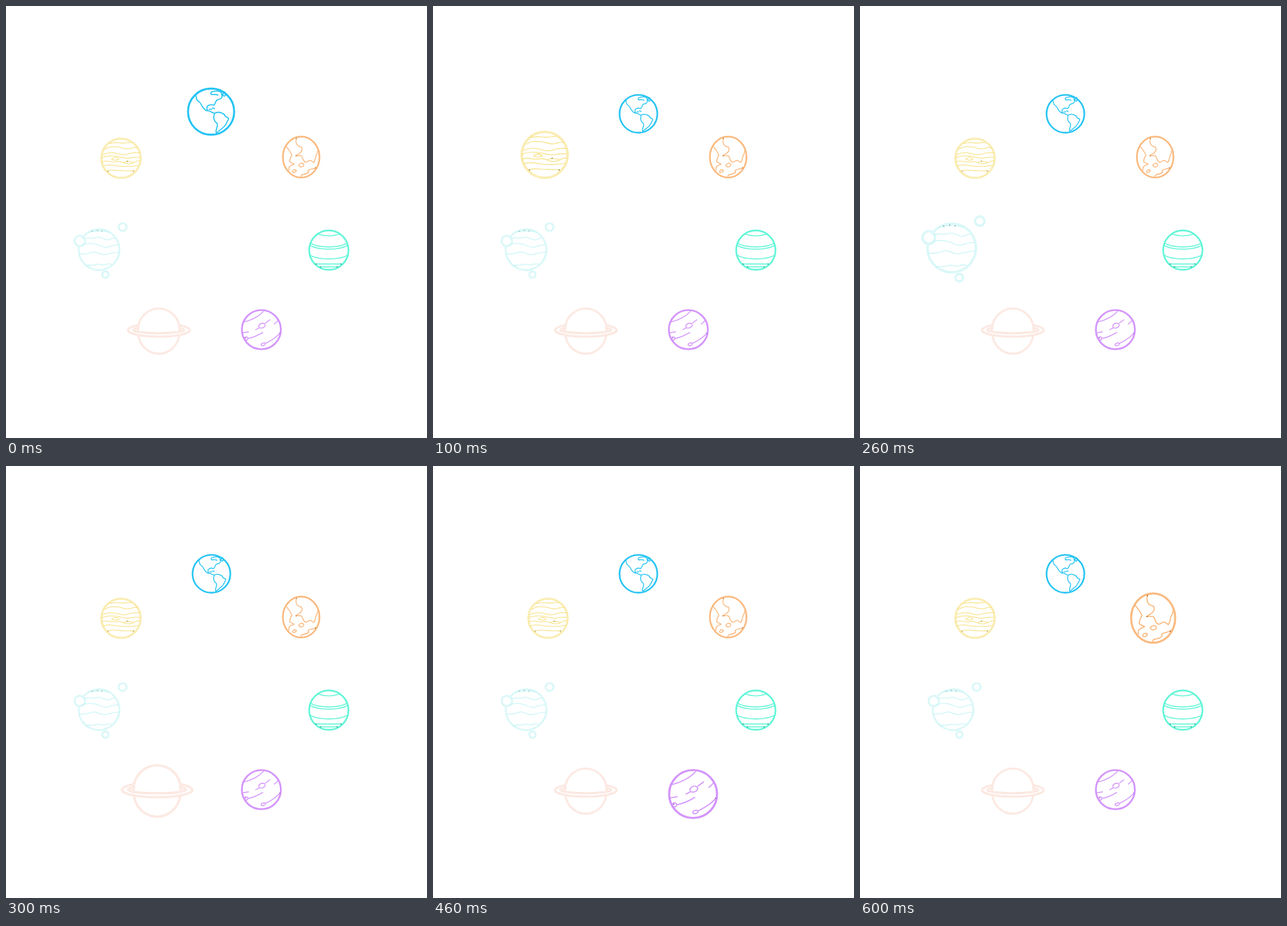
An HTML page for the animation above (0.7 s loop, 624 by 640 pixels).

```html
<!DOCTYPE html>
<html lang="en">
<head>
<meta charset="utf-8">
<title>Planets</title>
<style>
html, body { margin: 0; width: 100%; height: 100%; overflow: hidden; background: #fff; }
svg { display: block; }
</style>
</head>
<body>
<svg id="stage" width="624" height="640" viewBox="0 0 624 640" fill="none" stroke-linecap="round" stroke-linejoin="round"></svg>
<script>
const STEP = 100;

const oval = (x, y, rx, ry = rx) =>
  `M${x - rx} ${y}a${rx} ${ry} 0 1 1 ${2 * rx} 0a${rx} ${ry} 0 1 1 ${-2 * rx} 0z`;

// Each planet is drawn at its enlarged size; "rest" is the resting centre and scale.
const planets = [
  { // blue
    color: '#22c3f3', at: [304, 156.5], rest: [304.5, 159.7, .82], rimWidth: 2.9, lineWidth: 1.6,
    rim: oval(304, 156.5, 34.2),
    lines: `M281 132C283 135 281 139 285 141C289 143 289 146 291 149C293 152 295 154 297 155Q302 155 304 157L309 159
      M299 155C297 152 297 148 301 147C304 145 306 147 308 147C311 145 310 141 313 139C318 138 321 137 320 132
      C320 128 318 126 313 126C307 126 302 127 304 131C307 132 311 130 314 132
      M309 159C314 156 320 158 324 161C324 165 329 164 330 167C328 171 327 175 323 179Q317 184 312 188
      C309 185 315 179 313 174C307 170 307 165 309 159M306 151l3 1M301 153l4 0` + oval(323.5, 130.5, 2, 3)
  },
  { // yellow
    color: '#f7e080', at: [165.5, 220.5], rest: [170.5, 225.5, .855], pale: true,
    rim: oval(165.5, 220.5, 34),
    lines: `M146 195q8-2 16-1t21-1M138 205c8-6 14-4 22-4s12 5 20 3 8-3 14-2
      M134 214c9-4 16-4 23-2s14 4 22 1 12-2 19-2M132 220c8-4 16-4 24-3s18 5 26 3 10-1 16-1
      M149 222q7-6 13 0q-6 4-13 0zM169 228q9-4 19 0q-9 5-19 0z
      M132 227c9-4 13 0 20 0s10-2 17 1M188 228q6-4 11-3
      M134 234c9-4 18-1 26 0s20 2 35-1M142 243c8-4 16-1 23-1s16 1 23 0`,
    dots: [[176.5, 225.5], [143, 243], [187, 243]], dotColor: '#96803b'
  },
  { // pale cyan
    color: '#c4f3f4', at: [136, 358.5], rest: [138, 361, .84], pale: true,
    rim: `M107 337A36 36 0 1 1 100.5 352` + oval(102, 343, 9.3) + oval(177.5, 318.7, 7) + oval(147.2, 402.5, 5.6),
    lines: `M117 328q19-5 37 0M110 339c8-3 14 1 22-2s14 6 21 4 6-3 10-3
      M106 350c10-4 18-3 25-1s13 7 20 5 12-4 19-4M101 366c10 1 16 0 23-3s14 6 23 4 16-4 24-4
      M113 388c6-5 10 0 17-3s10 2 16 0 8-2 12-1`,
    dots: [[124, 326], [133, 324.5], [141, 325.5]], dotColor: '#78a6a8'
  },
  { // ringed pink
    color: '#fadbd0', at: [224, 479], rest: [226.5, 479.5, .88], pale: true,
    rim: `M189 483V479A35 35.5 0 0 1 259 479V483M190 490A34.5 35.5 0 0 0 258 490
      M190 471.5A52 11 0 1 0 258 471.5M190 476A43 5.5 0 1 0 258 476`,
    lines: ''
  },
  { // purple
    color: '#d495fb', at: [385.5, 486], rest: [378.5, 479.5, .815], rimWidth: 3.2, lineWidth: 1.6,
    rim: oval(385.5, 486, 35.5),
    lines: `M354 472C368 469 382 461 389 453M381 481C380 476 386 473 391 475C395 478 390 484 384 483Q382 483 381 481z
      M375 486l6-3M393 474l8-6M409 476q4-3 8-8M350 492l12-2M361 502C371 500 380 496 388 491
      M385 514C385 510 391 509 393 511C393 514 388 517 385 514zM393 511C403 506 414 500 420 491` + oval(358, 502, 3),
    dots: [[357, 501], [419, 492]], dotColor: '#9060b5'
  },
  { // teal
    color: '#60f5d7', at: [474, 361.5], rest: [478.5, 361.7, .825], rimWidth: 3, lineWidth: 1.7,
    rim: oval(474, 361.5, 35.3),
    lines: `M456 333q18 6 36 0M441 349C455 358 493 358 507 349M440 353C455 362 493 362 508 353
      M440 370.5C455 379.5 493 379.5 508 370.5M451 386.5h46M457 391.5h34`,
    dots: [[451, 386.5], [459, 391.5], [489, 391.5], [496, 386.5]], dotColor: '#176d5c'
  },
  { // orange
    color: '#fab97e', at: [434.5, 225.3], rest: [437.5, 223.8, .83], rimWidth: 3, lineWidth: 1.6,
    rim: oval(434.5, 225.3, 32.7, 36.5),
    lines: `M426 191C424 200 426 206 435 207.5C438 212 435 217 430 219.5L425 223C431 223 436 221 437 227
      C439 234 443 236 446 233C452 229 453 233 457 235C460 231 460 227 461 223Q464 219 464 214
      M407 205C410 210 415 214 418 222C415 226 414 231 414 234Q418 236 422 238C415 241 411 242 413 249
      M434 260C434 254 443 258 448 252C444 247 452 248 462 244
      M430 240Q434 234 439 238Q440 243 433 243zM419 251Q421 246 426 249Q425 253 420 253z`,
    dots: [[426, 192], [425.5, 223], [460, 244.5]], dotColor: '#a9652c'
  }
];

const stage = document.getElementById('stage');

function add(parent, name, attrs) {
  const node = document.createElementNS('http://www.w3.org/2000/svg', name);
  for (const key in attrs) node.setAttribute(key, attrs[key]);
  return parent.appendChild(node);
}

for (const p of planets) {
  const stroke = p.color;
  p.group = add(stage, 'g', {});
  add(p.group, 'path', { d: p.rim, stroke, 'stroke-width': p.rimWidth || 3 });
  if (p.pale) add(p.group, 'path', { d: p.rim, stroke: '#fff', 'stroke-width': 1.4, opacity: .6 });
  add(p.group, 'path', { d: p.lines, stroke, 'stroke-width': p.lineWidth || 1.2 });
  for (const [cx, cy] of p.dots || []) add(p.group, 'circle', { cx, cy, r: .9, fill: p.dotColor });
}

function draw() {
  const active = Math.floor(performance.now() / STEP) % planets.length;
  planets.forEach(({ group, at, rest: [x, y, scale] }, i) => {
    group.setAttribute('transform', i === active ? '' :
      `translate(${x} ${y}) scale(${scale}) translate(${-at[0]} ${-at[1]})`);
  });
  requestAnimationFrame(draw);
}
draw();
</script>
</body>
</html>
```
